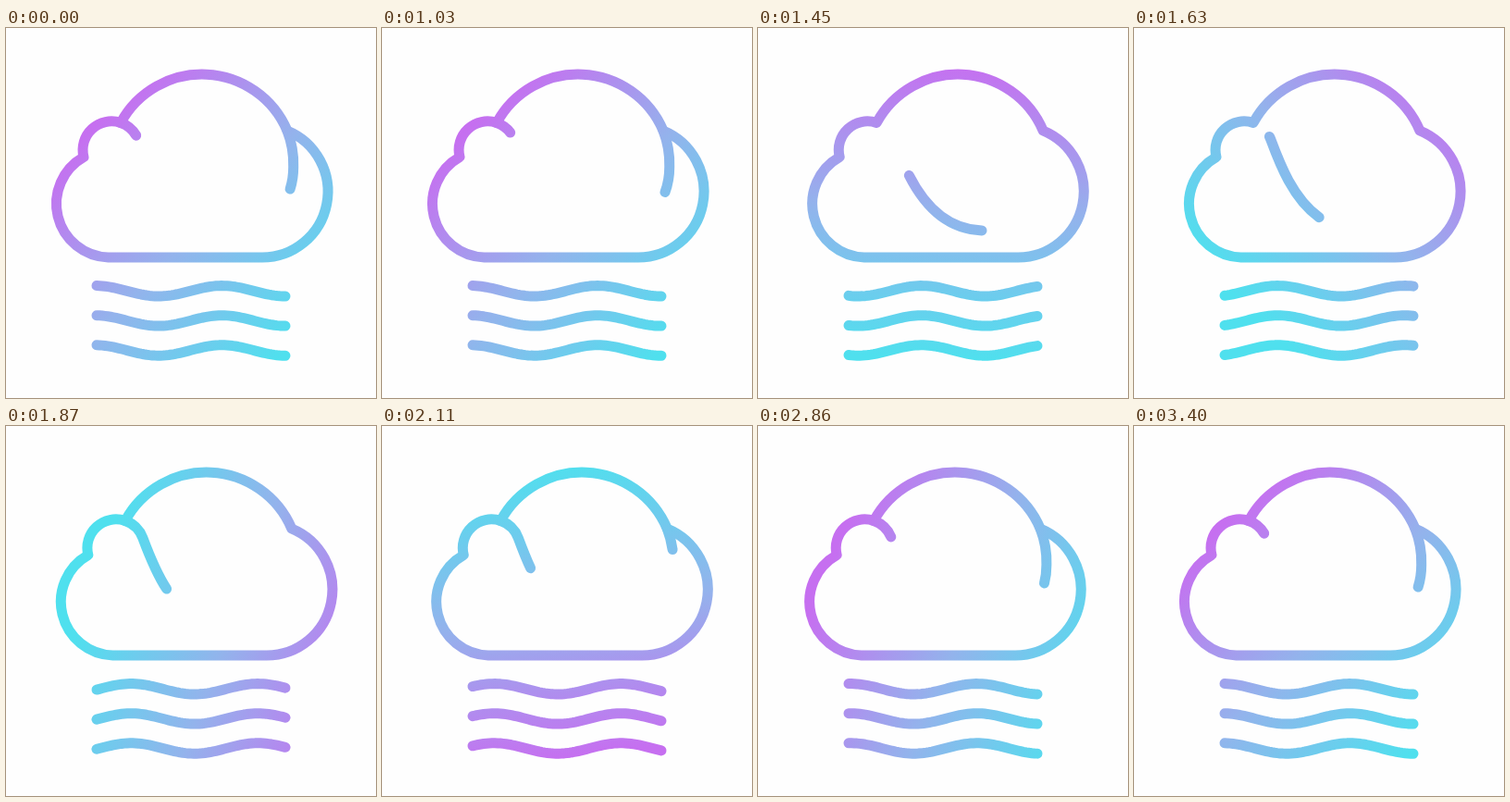
Animation of 400x400 px, one loop 3.43 s. Source, as an HTML page:

```html
<!DOCTYPE html>
<html lang="en">
<head>
<meta charset="utf-8">
<title>Foggy cloud</title>
<style>
  html, body { margin: 0; width: 100%; height: 100%; overflow: hidden; background: #fefefe; }
  svg { display: block; width: 100%; height: 100%; }
  path { fill: none; stroke: url(#tint); stroke-width: 11; stroke-linecap: round; stroke-linejoin: round; }
</style>
</head>
<body>
<svg viewBox="0 0 400 400">
  <defs>
    <linearGradient id="tint" gradientUnits="userSpaceOnUse">
      <stop offset="0" stop-color="#c66ff0"/>
      <stop offset=".5" stop-color="#93b3ec"/>
      <stop offset="1" stop-color="#4fe0ee"/>
    </linearGradient>
  </defs>
  <g id="cloud">
    <path d="M84 139.5A58 58 0 0 0 110.5 248H277A71.2 71.2 0 0 0 304 111A100 100 0 0 0 124 102.5A31 31 0 0 0 84 139.5Z"/>
    <path id="curl" stroke-dasharray="104 240"
      d="M304 111A100 100 0 0 1 310.7 150C310.7 195 278 219 241 219C180 219 157 158.6 143 121A31 31 0 0 0 124 102.5"/>
  </g>
  <path class="wave"/>
  <path class="wave"/>
  <path class="wave"/>
</svg>
<script>
const LOOP = 3430, HOLD = 1000, STEP = 30, MOVE = 2400;
const tint = document.getElementById('tint');
const cloud = document.getElementById('cloud');
const curl = document.getElementById('curl');
const waves = document.querySelectorAll('.wave');

const clamp = v => Math.min(1, Math.max(0, v));
const smooth = v => { v = clamp(v); return v * v * (3 - 2 * v); };

// Cubic Bezier easing, solved by bisection
function bezier(x1, y1, x2, y2) {
  const at = (u, a, b) => 3 * u * (1 - u) * ((1 - u) * a + u * b) + u * u * u;
  return x => {
    x = clamp(x);
    if (x === 0 || x === 1) return x;
    let lo = 0, hi = 1;
    for (let i = 0; i < 24; i++) {
      const mid = (lo + hi) / 2;
      if (at(mid, x1, x2) < x) lo = mid; else hi = mid;
    }
    return at(lo, y1, y2);
  };
}

const curlEase = bezier(.16, .1, 0, 1);
const waveEase = bezier(.15, 0, .12, 1);
const turnEase = bezier(.3, 0, .44, 1);

function wavePath(y, shift) {
  const points = [];
  for (let x = 98; x <= 302; x += 3) {
    const dy = 5.7 * Math.cos(2 * Math.PI * (x - 165 + shift) / 137);
    points.push(x + ' ' + (y + dy).toFixed(2));
  }
  return 'M' + points.join('L');
}

function turnGradient(p) {
  const angle = (360 * p - 45) * Math.PI / 180;
  const drift = Math.sin(Math.PI * p);
  const cx = 222 + 28 * drift, cy = 205 - 14 * drift;
  const dx = 160 * Math.sin(angle), dy = -160 * Math.cos(angle);
  const ends = { x1: cx + dx, y1: cy + dy, x2: cx - dx, y2: cy - dy };
  for (const key in ends) tint.setAttribute(key, ends[key]);
}

function draw(time) {
  const t = Math.floor(Math.max(0, time % LOOP - HOLD) / STEP) * STEP;
  const drift = 5 * (smooth(t / 600) - smooth((t - 700) / 1700));
  cloud.setAttribute('transform', `translate(${drift} 0)`);
  curl.setAttribute('stroke-dashoffset', 40 - 344 * curlEase(t / 2300));
  const shift = 137 * waveEase(t / MOVE);
  waves.forEach((wave, i) => wave.setAttribute('d', wavePath(284.3 + 32.1 * i, shift)));
  turnGradient(turnEase(t / MOVE));
}

const start = performance.now();
function tick() {
  draw(performance.now() - start);
  requestAnimationFrame(tick);
}
tick();
</script>
</body>
</html>
```
